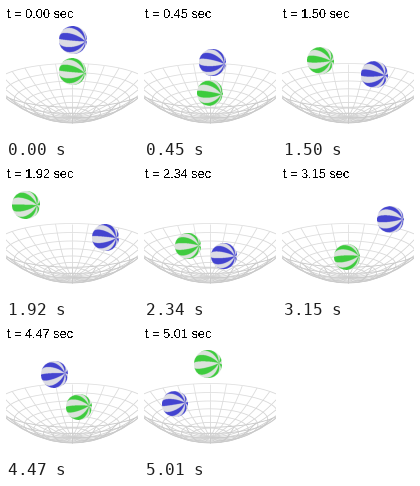
A matplotlib script for the animation above (5040 ms loop, 132 by 132 pixels).

```python
import numpy as np
import matplotlib.pyplot as plt
from matplotlib.animation import FuncAnimation
from matplotlib.collections import LineCollection

SIZE, DPI = 132, 100
FRAMES, STEP = 168, 0.03
G = 350.0        # gravity, px / s^2
PX = 72 / DPI    # one pixel in points
plt.rcParams["text.antialiased"] = False

# Contacts (time, x, y); each ball flies freely between them.
BLUE_HITS = [(0, 67, 34), (.405, 67, 62.7), (1.29, 85, 85), (1.83, 103, 75.6),
             (2.36, 78.3, 92.5), (3.225, 110.8, 61.7), (3.945, 86.3, 86.6),
             (4.86, 21, 83), (5.01, 31, 78)]
GREEN_HITS = [(0, 66, 66), (.41, 66, 92.5), (1.21, 53.5, 91.5), (1.315, 58.5, 80),
              (1.75, 10, 40), (2.38, 46, 87.5), (2.52, 33, 80), (3.16, 65.5, 92.6),
              (3.75, 12, 38.4), (4.27, 58, 91), (4.67, 87.5, 86), (5.01, 64, 38)]


def flight(hits, t):
    """Position on the parabola joining the contacts around t."""
    times = [h[0] for h in hits]
    i = int(np.clip(np.searchsorted(times, t, side="right") - 1, 0, len(hits) - 2))
    (t0, x0, y0), (t1, x1, y1) = hits[i], hits[i + 1]
    span, dt = t1 - t0, t - t0
    vy = (y1 - y0) / span - G * span / 2
    return x0 + (x1 - x0) * dt / span, y0 + vy * dt + G * dt * dt / 2


def bowl(r, a):
    """Perspective view of the paraboloid at polar radius r and angle a."""
    depth = r * np.sin(a)
    k = 1 / (1 - .2 * depth)
    x = 66 + 76 * k * r * np.cos(a)
    y = 45 + k * (30 + 36 * (1 - r * r) + 15 * depth)
    return np.stack([x, y], axis=-1)


def bowl_lines():
    segs, shades = [], []

    def add(r, a):
        segs.append(bowl(r, a))
        shades.append(str(.82 - .06 * np.mean(r * np.sin(a))))

    angles = np.linspace(0, 2 * np.pi, 25)
    radii = np.linspace(0, 1, 9)
    for a0, a1 in zip(angles[:-1], angles[1:]):
        for r0, r1 in zip(radii[:-1], radii[1:]):
            add(np.full(6, r1), np.linspace(a0, a1, 6))
            add(np.linspace(r0, r1, 6), np.full(6, a0))
    return LineCollection(segs, colors=shades, linewidths=.8 * PX, zorder=1)


N = 112
gx, gy = np.meshgrid(*[(np.arange(N) + .5) / N * 2 - 1] * 2)
rr = gx ** 2 + gy ** 2
NORMAL = np.stack([gx, gy, np.sqrt(np.clip(1 - rr, 0, 1))], axis=-1)


class Ball:
    def __init__(self, ax, hits, color, pale, spin):
        self.hits, self.spin = hits, spin
        self.color, self.pale = np.array(color) / 255, np.array(pale) / 255
        self.img = ax.imshow(np.zeros((N, N, 4)), aspect="auto", zorder=3)

    def texture(self, t):
        # The pole points right and sways a little while the ball turns about it.
        yaw, pitch = .95 + .1 * np.cos(2 * t), .1 * np.cos(self.spin * t)
        pole = np.array([np.sin(yaw) * np.cos(pitch), np.sin(pitch),
                         np.cos(yaw) * np.cos(pitch)])
        u = np.cross(pole, [0, 1, 0])
        u /= np.linalg.norm(u)
        v = np.cross(pole, u)
        lon = np.arctan2(NORMAL @ v, NORMAL @ u) + self.spin * t
        striped = np.sin(6 * lon)[..., None] > 0
        shape = np.where(striped, self.color, self.pale)
        return np.concatenate([shape, (rr <= 1)[..., None]], axis=-1)

    def update(self, t):
        x, y = flight(self.hits, t)
        r = 14.3 - .018 * y    # lower is farther from the eye
        self.img.set_data(self.texture(t))
        self.img.set_extent((x - r, x + r, y + r, y - r))


fig = plt.figure(figsize=(SIZE / DPI, SIZE / DPI), dpi=DPI, facecolor="white")
ax = fig.add_axes([0, 0, 1, 1])
ax.add_collection(bowl_lines())
balls = [Ball(ax, GREEN_HITS, (62, 204, 62), (220, 226, 220), .8),
         Ball(ax, BLUE_HITS, (68, 68, 208), (220, 220, 228), -.6)]
ax.set_xlim(0, SIZE)
ax.set_ylim(SIZE, 0)
ax.axis("off")
clock = ax.text(1.3, 12, "", family="Liberation Sans", fontsize=12.8 * PX,
                color="black", va="baseline", zorder=4)


def draw(i):
    t = i * STEP
    clock.set_text(f"t = {t:.2f} sec")
    for ball in balls:
        ball.update(t)
    return [clock] + [b.img for b in balls]


anim = FuncAnimation(fig, draw, frames=FRAMES, interval=STEP * 1000,
                     repeat=True, repeat_delay=0, blit=False)
plt.show()
```
